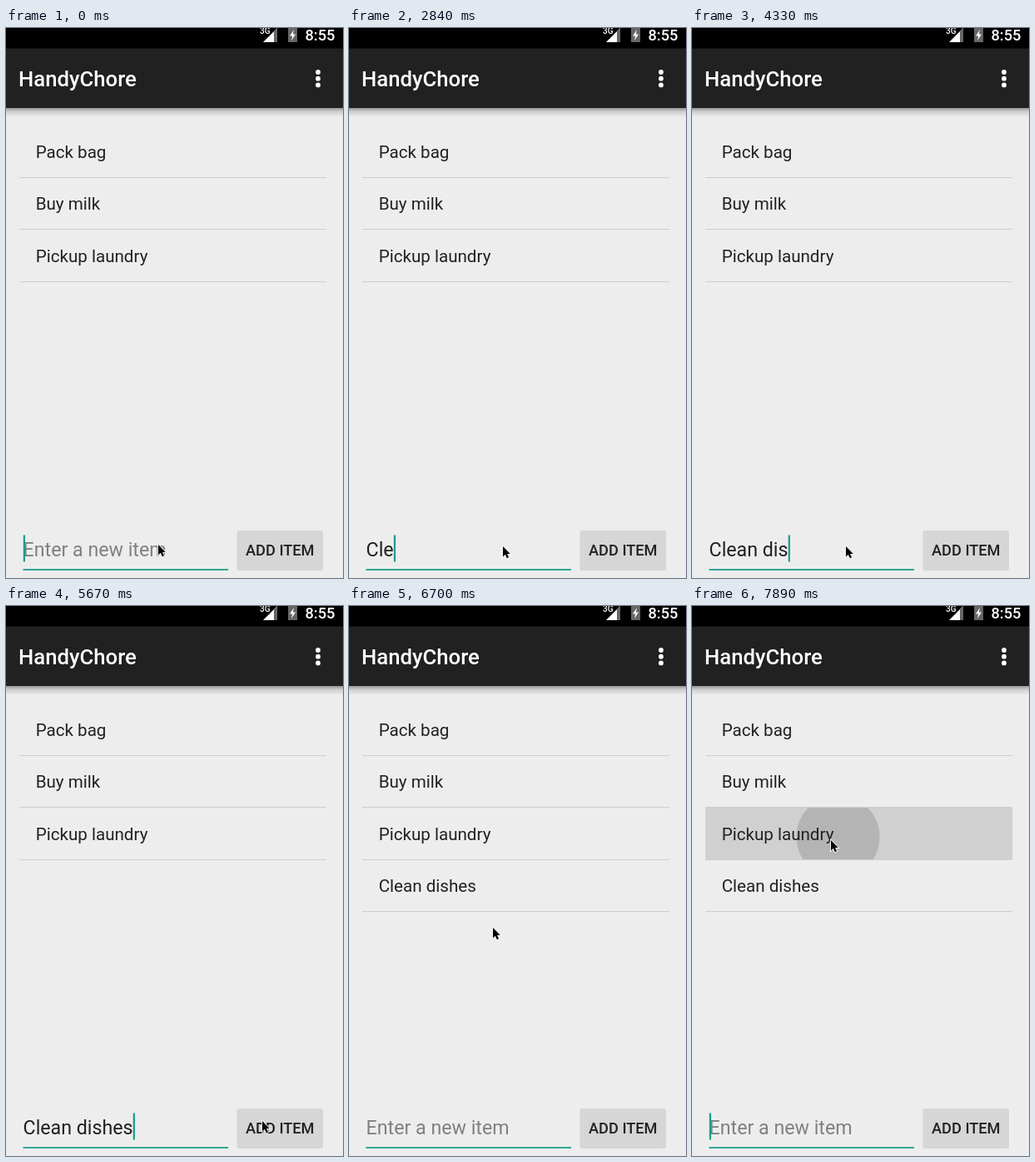
Write an HTML page that moves like this. It is 405 by 660 pixels and loops after 8 s.

```html
<!DOCTYPE html>
<html lang="en">
<head>
<meta charset="utf-8">
<title>To-do list</title>
<style>
  html, body { margin: 0; width: 100%; height: 100%; overflow: hidden; background: #ededed; }
  svg { display: block; width: 405px; height: 660px; font-family: Roboto, sans-serif; }
  text { white-space: pre; }
  .item { font-size: 20.6px; fill: #212121; }
  .medium { font-weight: 500; }
</style>
</head>
<body>
<svg viewBox="0 0 405 660">
  <defs>
    <linearGradient id="shade" x2="0" y2="1">
      <stop offset="0" stop-color="#000" stop-opacity=".36"/>
      <stop offset=".4" stop-color="#000" stop-opacity=".13"/>
      <stop offset="1" stop-color="#000" stop-opacity="0"/>
    </linearGradient>
    <clipPath id="rowClip"><rect x="16" y="242" width="369" height="62"/></clipPath>
    <clipPath id="buttonClip"><rect x="278" y="603" width="102.5" height="46.5" rx="2"/></clipPath>
  </defs>
  <rect width="405" height="660" fill="#ededed"/>
  <rect y="96" width="405" height="11" fill="url(#shade)"/>
  <rect width="405" height="96" fill="#212121"/>
  <rect width="405" height="24.5"/>

  <!-- Status bar -->
  <path d="M309 17L326 0V17Z" fill="#fff"/>
  <path d="M322 4L326 0V17H322Z" fill="#666"/>
  <text class="medium" x="305" y="7" font-size="10" fill="#fff" stroke="#000" stroke-width="2" paint-order="stroke">3G</text>
  <path d="M339 0H350V17H339Z" fill="#666"/>
  <path d="M346 2L341 9.5H344.2L343 15L348 7.5H344.8Z" fill="#fff"/>
  <text class="medium" x="359.5" y="15" font-size="18.2" fill="#fff">8:55</text>

  <!-- App bar -->
  <text class="medium" x="15" y="70" font-size="25.7" fill="#fff">HandyChore</text>
  <g fill="#fff"><circle cx="375" cy="53" r="2.9"/><circle cx="375" cy="60.7" r="2.9"/><circle cx="375" cy="68.4" r="2.9"/></g>

  <!-- List -->
  <g clip-path="url(#rowClip)">
    <rect id="highlight" x="16" y="242" width="369" height="62"/>
    <circle id="rowRipple" cx="175.5" cy="277" opacity=".135"/>
  </g>
  <g id="list"></g>

  <!-- Entry field and button -->
  <text id="entry" x="20.6" y="634" font-size="23.2"></text>
  <rect id="caret" y="608.5" width="2.2" height="32" fill="#1a9c8e"/>
  <rect x="20.5" y="649" width="246.5" height="2" fill="#35a597"/>
  <rect x="277.5" y="603.5" width="103.5" height="47.5" rx="2" opacity=".1"/>
  <rect x="278" y="603" width="102.5" height="46.5" rx="2" fill="#d6d6d6"/>
  <circle id="buttonRipple" cx="310" cy="622" opacity=".135" clip-path="url(#buttonClip)"/>
  <text class="medium" x="288" y="632.5" font-size="18.2" fill="#212121">ADD ITEM</text>

  <path id="pointer" d="M0 0V12.4L2.8 9.8L4.8 14.2L7 13.3L5 9H8.7Z" stroke="#f2f2f2" stroke-width="1.8" paint-order="stroke"/>
</svg>
<script>
const LOOP = 8000;
const TICK = 148.8; // the screen refreshes once per tick
const TASK = "Clean dishes";
const BLINK = 500;
const SUBMIT = 40, RELEASE = 43, PRESS = 52; // in ticks

// One letter per tick, with a pause between the two words.
const keyTicks = [...TASK].map((_, i) => i + (i < 6 ? 17 : 21));

// Pointer stops: tick, x, y.
const stops = [[12, 183, 620], [13, 185, 622], [35, 185, 622], [38, 308, 618],
  [42, 308, 618], [45, 173, 386], [50, 167, 281]];

const $ = id => document.getElementById(id);
const set = (id, attrs) => {
  for (const name in attrs) $(id).setAttribute(name, attrs[name]);
};

function pointerAt(tick) {
  const next = stops.findIndex(([at]) => at > tick);
  if (next < 1) return stops.at(next).slice(1);
  const [t0, x0, y0] = stops[next - 1], [t1, x1, y1] = stops[next];
  const k = (tick - t0) / (t1 - t0);
  return [x0 + (x1 - x0) * k, y0 + (y1 - y0) * k];
}

$("list").innerHTML = ["Pack bag", "Buy milk", "Pickup laundry", TASK].map((label, i) => {
  const y = Math.round(156 + i * 62.4);
  return `<g><text class="item" x="35.7" y="${y}">${label}</text>
    <rect x="16" y="${y + 23}" width="369" height="1" fill="#cecece"/></g>`;
}).join("");
const newRow = $("list").lastElementChild;
const entry = $("entry");

function draw(time) {
  const tick = Math.floor(time / TICK);
  const submitted = tick >= SUBMIT;
  const count = submitted ? 0 : keyTicks.filter(key => key <= tick).length;
  const text = TASK.slice(0, count) || "Enter a new item";
  if (entry.textContent !== text) entry.textContent = text;
  set("entry", { fill: count ? "#212121" : "#808080" });

  // Every edit restarts the blink; the refresh shows it slightly late.
  const lastEdit = submitted ? SUBMIT : keyTicks[count - 1] ?? -2;
  const sinceEdit = (tick - lastEdit) * TICK + 110;
  set("caret", {
    x: 20.8 + (count ? entry.getComputedTextLength() : 0),
    opacity: 1 - Math.floor(sinceEdit / BLINK) % 2
  });

  set("pointer", { transform: `translate(${pointerAt(tick)})` });
  newRow.style.display = submitted ? "" : "none";

  const held = Math.max(0, tick - PRESS + 1);
  set("buttonRipple", { r: submitted && tick < RELEASE ? 28 * (tick - SUBMIT + 1) : 0 });
  set("rowRipple", { r: 25 * held });
  set("highlight", { opacity: 0.061 * held });
}

const begin = performance.now();
function frame() {
  draw((performance.now() - begin) % LOOP);
  requestAnimationFrame(frame);
}
frame();
</script>
</body>
</html>
```
